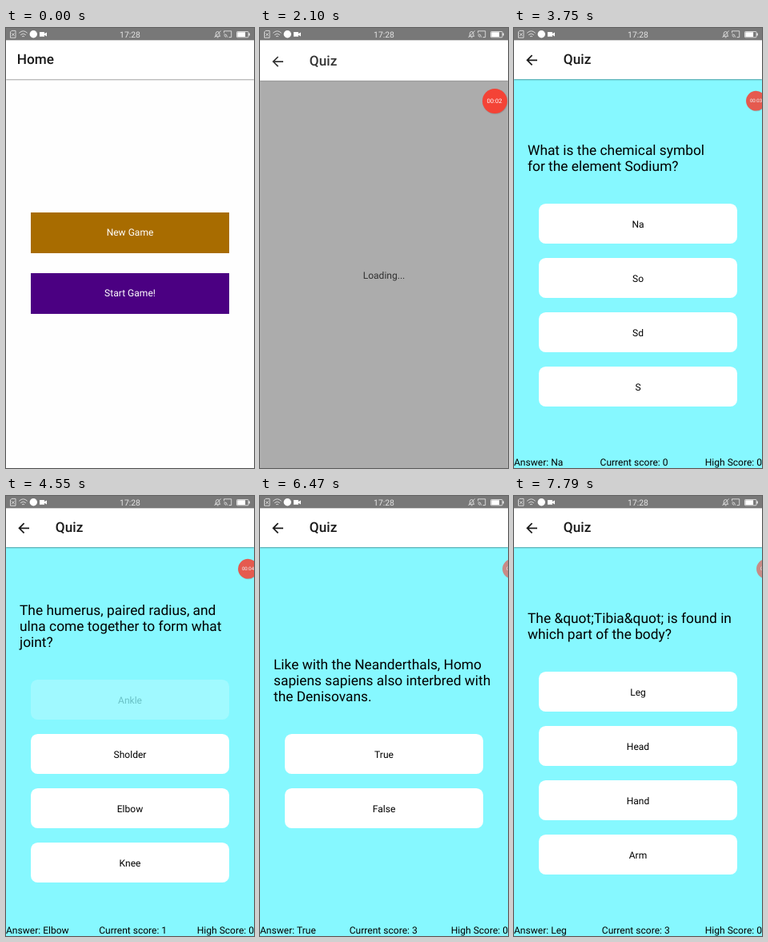
Recreate the animation shown at these times as an HTML page. Size 310 by 551 pixels, loop 8000 ms.

```html
<!DOCTYPE html>
<html lang="en">
<head>
<meta charset="utf-8">
<title>Quiz app</title>
<style>
html, body { margin: 0; width: 100%; height: 100%; overflow: hidden; background: #fefefe; }
#stage { position: absolute; left: 0; top: 0; width: 310px; height: 551px; overflow: hidden; background: #fefefe; color: #000; font: 12.06px/14px Roboto, sans-serif; text-rendering: geometricPrecision; }
#stage div, #stage svg { position: absolute; }
#page { left: 0; top: 0; width: 310px; height: 551px; }
#body { left: 0; top: 64px; width: 310px; height: 500px; }
#header { left: 0; top: 15px; width: 310px; height: 49px; background: #fff; box-shadow: 0 1px 1.5px rgba(0,0,0,.36); }
#title { top: 15px; font-size: 17.22px; line-height: 20px; font-weight: 500; color: #1a1a1a; }
#arrow { left: 15.4px; top: 17.6px; }
#status { left: 0; top: 0; }
.button { left: 31px; width: 248px; height: 50.6px; line-height: 51px; text-align: center; }
.choice { background: #fff; border-radius: 8.6px; line-height: 52.4px; }
.question { left: 17px; font-size: 17.35px; line-height: 20px; white-space: pre; }
.loading { left: 0; width: 310px; top: 301px; text-align: center; }
.scores { left: 0; top: 536.5px; width: 310px; display: flex; justify-content: space-between; white-space: pre; }
#bubble { left: -15.5px; top: -15.5px; width: 31px; height: 31px; border-radius: 50%; background: #f44336; color: #fff; font-size: 7.6px; line-height: 31px; text-align: center; box-shadow: .5px .8px 1px rgba(110,110,110,.45); }
</style>
</head>
<body>
<div id="stage">
  <div id="page">
    <div id="body"></div>
    <div id="content"></div>
    <div id="header">
      <svg id="arrow" width="15" height="15" fill="none" stroke="#1a1a1a" stroke-width="1.7"><path d="M14 7.3H2M7.6 1.2L1.5 7.3l6.1 6.1"/></svg>
      <div id="title"></div>
    </div>
  </div>
  <svg id="status" width="310" height="16">
    <rect width="310" height="15.3" fill="#787878"/>
    <g fill="none" stroke="#e2e2e2" stroke-width=".9">
      <path d="M5.5 5l1.5-1.6h5v8.8H5.5zM7.2 6.5l3.2 3.4M10.4 6.5L7.2 9.9"/>
      <path d="M16.3 6.3q5.2-5 10.4 0M18.2 8.6q3.3-3 6.6 0M20 10.8q1.5-1.4 3 0"/>
      <path d="M261.5 10.3h6.2l-.9-1.3V6.5a2.3 2.5 0 0 0-4.5 0V9zM263.6 11.8h2M260.5 12L268.5 3.5"/>
      <path d="M272.5 6V3.8h9.2v7.8h-3.2M272.5 7.6a4 4 0 0 1 4 4M272.5 9.6a2 2 0 0 1 2 2"/>
      <rect x="288.5" y="4.5" width="14.5" height="7.3" rx=".8"/>
    </g>
    <g fill="#fff">
      <circle cx="34.3" cy="7.7" r="4.7"/>
      <path d="M42 5h6v2l3-1.6v5L48 8.8v1.9h-6zM289.3 5.2h9.8v5.9h-9.8zM303.4 6.6h1.3v3h-1.3z"/>
    </g>
    <text x="155" y="11.7" text-anchor="middle" font-family="Roboto, sans-serif" font-size="10.4" fill="#e4e4e4">17:28</text>
  </svg>
  <div id="bubble"></div>
</div>
<script>
const LOOP = 8000;
const CYAN = '#86f8ff';
const $ = id => document.getElementById(id);
const content = $('content');

const screens = [
  { at: 0, home: true },
  { at: 2100, loading: true },
  { at: 3250, score: 0, answer: 'Na', lines: ['What is the chemical symbol', 'for the element Sodium?'], choices: ['Na', 'So', 'Sd', 'S'] },
  { at: 4550, score: 1, answer: 'Elbow', lines: ['The humerus, paired radius, and', 'ulna come together to form what', 'joint?'], choices: ['Ankle', 'Sholder', 'Elbow', 'Knee'] },
  { at: 5510, score: 2, answer: 'Gold', lines: ['Au on the Periodic Table refers to', 'which element?'], choices: ['Oxygen', 'Silver', 'Nickel', 'Gold'] },
  { at: 6470, score: 3, answer: 'True', lines: ['Like with the Neanderthals, Homo', 'sapiens sapiens also interbred with', 'the Denisovans.'], choices: ['True', 'False'] },
  { at: 7430, score: 3, answer: 'Leg', lines: ['The &quot;Tibia&quot; is found in', 'which part of the body?'], choices: ['Leg', 'Head', 'Hand', 'Arm'] }
];

// Button index and its [time, opacity] steps; a fade may outlive a screen change.
const presses = [
  { button: 0, keys: [[1240, 1], [1300, .3], [1520, .35], [1740, 1]] },
  { button: 0, keys: [[4300, 1], [4350, .22], [4600, .22], [4900, 1]] },
  { button: 2, keys: [[5350, 1], [5400, .22], [5560, .22], [5820, 1]] },
  { button: 1, keys: [[7210, 1], [7260, .22], [7480, .22], [7780, 1]] }
];

// [time, x, y, scale, opacity]
const bubbleKeys = [
  [100, 293, 91, .3, 0], [400, 293, 91, 1, 1], [2450, 293, 91, 1, 1],
  [2740, 302, 90.7, .8, .87], [4790, 302, 90.7, .8, .87], [5120, 315, 90.7, .8, .6]
];
const ticks = [920, 2100, 2940, 3960];

function sample(keys, t) {
  const next = keys.findIndex(k => k[0] > t);
  if (next < 0) return keys[keys.length - 1].slice(1);
  if (next === 0) return keys[0].slice(1);
  const a = keys[next - 1], b = keys[next];
  const p = (t - a[0]) / (b[0] - a[0]);
  return a.slice(1).map((v, i) => v + (b[i + 1] - v) * p);
}

function add(className, text, style = {}, parent = content) {
  const el = document.createElement('div');
  el.className = className;
  el.textContent = text;
  Object.assign(el.style, style);
  parent.append(el);
  return el;
}

let shown, buttons = [];

function build(screen) {
  shown = screen;
  content.textContent = '';
  buttons = [];
  $('title').textContent = screen.home ? 'Home' : 'Quiz';
  $('title').style.left = screen.home ? '13.8px' : '61.8px';
  $('arrow').style.display = screen.home ? 'none' : '';
  if (screen.home) {
    buttons = [['New Game', '#a86c00', 231], ['Start Game!', '#4b0082', 307.4]].map(([text, background, top]) =>
      add('button', text, { background, top: top + 'px', color: '#fff' }));
  } else if (screen.loading) {
    add('loading', 'Loading...');
  } else {
    const { lines, choices, answer, score } = screen;
    const top = 199.6 + 10 * lines.length + 34 * (4 - choices.length);
    add('question', lines.join('\n'), { top: top - 35.6 - 20 * lines.length + 'px' });
    buttons = choices.map((text, i) => add('button choice', text, { top: top + 68 * i + 'px' }));
    const row = add('scores', '');
    for (const text of [`Answer: ${answer}`, `Current score: ${score}`, 'High Score: 0']) {
      add('', text, { position: 'static' }, row);
    }
  }
}

function render(t) {
  const screen = screens.filter(s => s.at <= t).pop();
  if (screen !== shown) build(screen);

  const entering = screen.loading && t < 2200;
  $('page').style.transform = entering ? 'translateY(1.8px)' : '';
  $('body').style.background = screen.home ? '#fefefe' : entering ? '#acacac' : CYAN;
  $('body').style.boxShadow = entering ? 'inset 0 0 2px #d0d0d0' : '';
  $('title').style.opacity = $('arrow').style.opacity = entering ? .88 : 1;
  content.style.opacity = entering ? .72 : 1;

  buttons.forEach((el, i) => {
    const press = presses.find(p => p.button === i && t >= p.keys[0][0] && t < p.keys[3][0]);
    el.style.opacity = press ? sample(press.keys, t)[0] : 1;
  });

  const [x, y, scale, opacity] = sample(bubbleKeys, t);
  $('bubble').style.transform = `translate(${x}px, ${y}px) scale(${scale})`;
  $('bubble').style.opacity = opacity;
  $('bubble').textContent = '00:0' + ticks.filter(at => at <= t).length;
}

const start = performance.now();
function frame() {
  render((performance.now() - start) % LOOP);
  requestAnimationFrame(frame);
}
frame();
</script>
</body>
</html>
```
